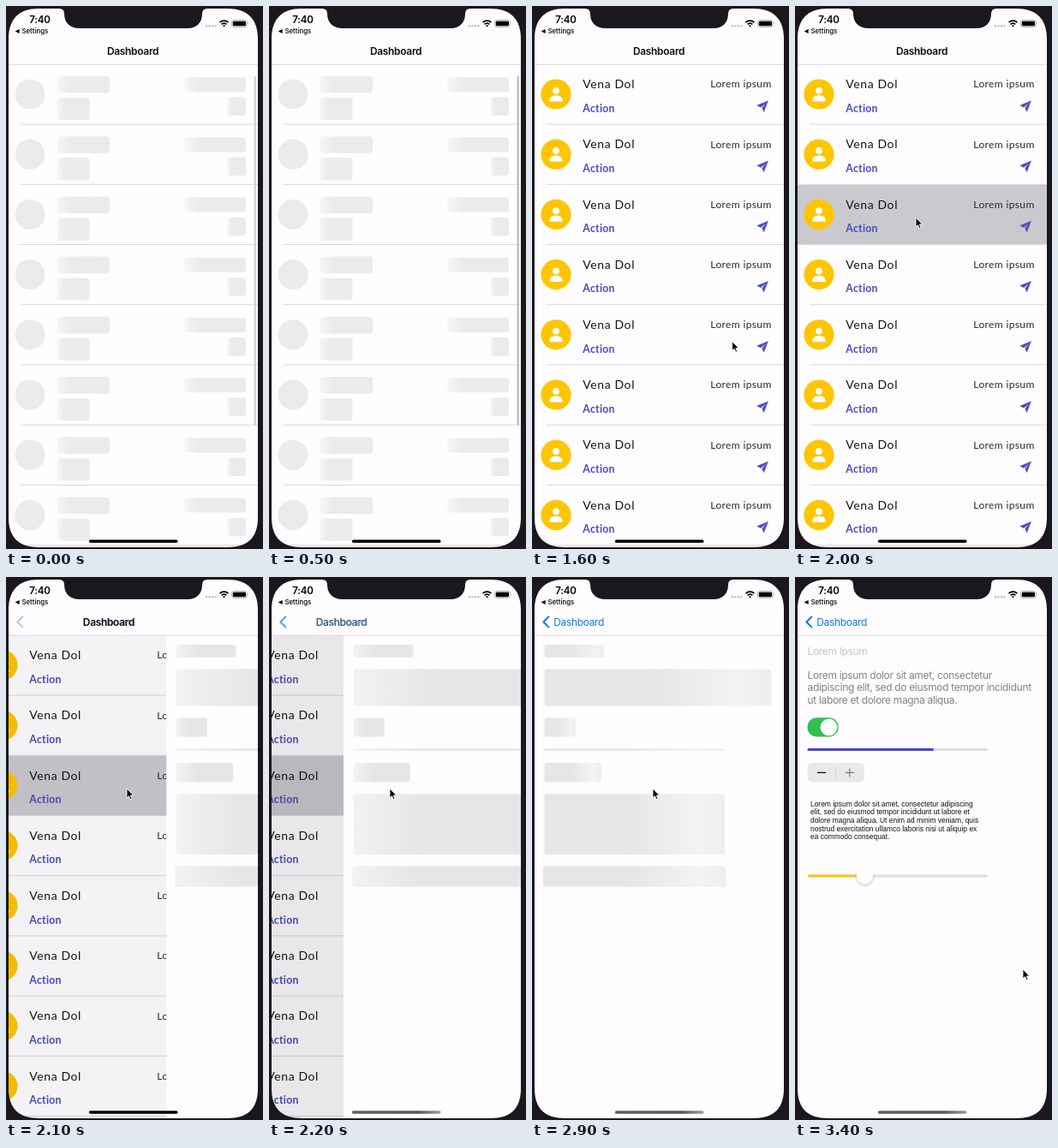
An HTML page that plays this animation: 300x634 px, repeating every 3.5 s.

```html
<!DOCTYPE html>
<html lang="en">
<head>
<meta charset="utf-8">
<title>Dashboard</title>
<style>
  html, body { margin: 0; width: 100%; height: 100%; overflow: hidden; background: #1a181c; }
  svg { display: block; width: 100%; height: 100%; }
  text { white-space: pre; }
  .ui { font: 400 11.93px Inter, Roboto, sans-serif; letter-spacing: -.025em; }
  .semi { font-weight: 600; }
  .blue { fill: #0a7af0; }
  .name { font: 400 14px Lato, sans-serif; letter-spacing: .6px; fill: #141316; }
  .action { font: 700 12.3px Lato, sans-serif; letter-spacing: .25px; fill: #4b4bbf; }
  .note { font: 400 12px Lato, sans-serif; letter-spacing: .37px; fill: #2a292d; }
  .small { font: 400 8.43px "Liberation Sans", Arial, sans-serif; fill: #111; }
  .line { fill: #d9d8db; }
</style>
</head>
<body>
<svg viewBox="0 0 300 634" xmlns="http://www.w3.org/2000/svg">
  <defs>
    <linearGradient id="rowSheen" x1="0" x2=".24">
      <stop stop-color="#f6f5f7"/><stop offset="1" stop-color="#ebeaec"/>
    </linearGradient>
    <linearGradient id="sheen">
      <stop stop-color="#e6e5e8"/><stop offset=".5" stop-color="#f3f2f4"/><stop offset="1" stop-color="#e6e5e8"/>
    </linearGradient>
    <linearGradient id="homeGray">
      <stop stop-color="#605f63"/><stop offset=".75" stop-color="#58575b"/><stop offset="1" stop-color="#a09fa3"/>
    </linearGradient>
    <filter id="soft" x="-50%" y="-50%" width="200%" height="200%">
      <feDropShadow dx="0" dy="1.6" stdDeviation="1.8" flood-opacity=".25"/>
    </filter>
  </defs>

  <rect width="300" height="634" fill="#fffdff"/>

  <g id="list">
    <rect id="picked" x="0" y="208.4" width="400" height="70.2" fill="#cac9ce"/>
    <g id="rowBones"></g>
    <g id="rowData"></g>
    <g id="rowLines" class="line"></g>
    <rect id="bar" x="289.5" y="82" width="2.4" height="407.5" rx="1.2" fill="#bfbec1"/>
  </g>
  <rect id="dim" y="68" width="300" height="566"/>

  <g id="detail">
    <rect x="3" y="68" width="300" height="566" fill="#fffdff"/>
    <g id="bones" fill="url(#sheen)"></g>
    <g id="form">
      <text class="ui" x="14.5" y="90.5" fill="#c4c3c6">Lorem Ipsum</text>
      <g id="para" class="ui" fill="#828185"></g>
      <rect x="14.5" y="164.3" width="36.2" height="22.2" rx="11.1" fill="#30bf50"/>
      <circle cx="39.5" cy="175.4" r="9.9" fill="#fff"/>
      <rect x="14.5" y="200" width="210.5" height="3" rx="1.5" fill="#dfdee1"/>
      <rect x="14.5" y="200" width="147.5" height="3" rx="1.5" fill="#4b4bbf"/>
      <rect x="14.5" y="217" width="66.3" height="22.5" rx="5.5" fill="#e9e8eb"/>
      <rect x="47.1" y="221.8" width=".9" height="13" fill="#cbcacd"/>
      <path d="M26 228.4h10" stroke="#111" stroke-width="1.3"/>
      <path d="M58.8 228.4h10M63.8 223.4v10" stroke="#7a797d" stroke-width="1.2"/>
      <g id="story" class="small"></g>
      <rect x="15" y="347.5" width="210" height="3" rx="1.5" fill="#dfdee1"/>
      <rect x="15" y="347.5" width="66" height="3" rx="1.5" fill="#fec31c"/>
      <circle cx="81.5" cy="348.6" r="9.8" fill="#fff" filter="url(#soft)"/>
    </g>
  </g>

  <g id="nav">
    <rect width="300" height="68" fill="#fffdff"/>
    <rect y="67.8" width="300" height="1" fill="#d9d8db"/>
    <path id="chevron" d="M19.4 46.4L13.4 52.5L19.4 58.6" fill="none" stroke="#0a7af0" stroke-width="2" stroke-linecap="round" stroke-linejoin="round"/>
    <g id="title">
      <text id="titleBlue" class="ui blue" x="0" y="56.6">Dashboard</text>
      <text id="titleBlack" class="ui semi" x="0" y="56.6" fill="#0c0b0e">Dashboard</text>
    </g>
    <text class="ui semi" x="27.3" y="20.2" style="font-size:11.6px">7:40</text>
    <path d="M10.6 29.5l5-2.6v5.2z"/>
    <text class="ui" x="18.4" y="32.3" style="font-size:7.9px;font-weight:500;letter-spacing:0">Settings</text>
    <g fill="#c3c2c5">
      <circle cx="233.9" cy="23.3" r="1.3"/><circle cx="237.4" cy="23.3" r="1.3"/>
      <circle cx="240.9" cy="23.3" r="1.3"/><circle cx="244.4" cy="23.3" r="1.3"/>
    </g>
    <g fill="none" stroke="#000" stroke-width="1.7">
      <path d="M249.6 19.1a7 7 0 0 1 9.8 0M251.6 21.4a4.3 4.3 0 0 1 5.8 0"/>
      <path d="M254.5 24.6l-1.5-1.7a2.2 2.2 0 0 1 3 0z" fill="#000" stroke="none"/>
    </g>
    <rect x="263.6" y="16.6" width="17.6" height="7.8" rx="2.3" fill="none" stroke="#98979a" stroke-width=".8"/>
    <rect x="264.8" y="17.8" width="15.2" height="5.4" rx="1.3"/>
    <path d="M282.1 19.2q1.2 1.3 0 2.6z" fill="#98979a"/>
  </g>

  <rect id="home" x="96.8" y="623.2" width="103.8" height="3.6" rx="1.8"/>
  <path fill="#1a181c" fill-rule="evenodd" d="M0 0H300V634H0Z
    M38 3H62Q68 3 68 9C68 19 74 26 86 26H212C223 26 229 19 229 9Q229 3 235 3H258
    C282 3 294 15 294 39V597C294 621 282 632 258 632H39C15 632 3 621 3 597V39C3 15 15 3 38 3Z"/>

  <path id="cursor" d="M0 0V11L2.5 8.7L4.2 12.6L6 11.8L4.3 8H7.7Z" stroke="#fff" stroke-width=".9" stroke-linejoin="round"/>
</svg>

<script>
const LOOP = 3500, STEP = 100, ROW = 70.2, WIDTH = 291;
const $ = id => document.getElementById(id);
const clamp = v => Math.min(1, Math.max(0, v));
const smooth = v => { const k = clamp(v); return k * k * (3 - 2 * k); };
const mix = (a, b, k) => a + (b - a) * k;
const show = (id, on) => $(id).setAttribute('visibility', on ? 'visible' : 'hidden');
const fade = (id, v) => $(id).setAttribute('opacity', clamp(v));
const move = (id, x, y = 0) => $(id).setAttribute('transform', `translate(${x} ${y})`);

const box = (x, y, w, h, r) => `<rect x="${x}" y="${y}" width="${w}" height="${h}" rx="${r}"/>`;
const rows = make => Array.from({ length: 8 }, (_, i) =>
  `<g transform="translate(0 ${i * ROW})">${make}</g>`).join('');
const lines = (list, x, y, gap) => list.map((s, i) =>
  `<text x="${x}" y="${y + i * gap}">${s}</text>`).join('');

$('rowBones').innerHTML = rows(
  '<circle cx="28" cy="103" r="17.6" fill="#ebeaec"/><g fill="url(#rowSheen)">' +
  box(59.3, 82, 61.7, 19.6, 3.5) + box(59.3, 107, 38.2, 26, 3.5) +
  box(208.3, 83.2, 71.7, 17, 3.5) + box(258.5, 106.3, 21.5, 21.6, 3.5) + '</g>');

$('rowData').innerHTML = rows(`
  <circle cx="28" cy="103" r="17.6" fill="#fec500"/>
  <g fill="#fff"><circle cx="28" cy="98.8" r="3.9"/>
  <path d="M20.2 110.3C20.2 106.2 24 104.2 28 104.2S35.8 106.2 35.8 110.3Q35.8 111.4 34.7 111.4H21.3Q20.2 111.4 20.2 110.3Z"/></g>
  <text class="name" x="59.3" y="96.2">Vena Dol</text>
  <text class="action" x="59.3" y="123.8">Action</text>
  <text class="note" x="208.3" y="95.4">Lorem ipsum</text>
  <path d="M275.5 110.8L262.8 116L267 118.2L273.4 113L268.7 119.2L270.6 123.4Z" fill="#4b4bbf" stroke="#4b4bbf" stroke-width=".5" stroke-linejoin="round"/>`);

$('rowLines').innerHTML = rows('<rect x="17" y="137.6" width="283" height="1"/>');

$('bones').innerHTML = box(14.5, 79, 69.7, 15, 3) + box(14.5, 107.4, 264.7, 43.2, 3) +
  box(14.5, 164.4, 36.2, 22, 3) + box(14.5, 200.2, 210.7, 2.8, 1) +
  box(14.5, 217, 66.3, 22.6, 3) + box(14.5, 253.3, 210.7, 70.6, 3) +
  box(13, 337.6, 213.5, 24.2, 3);

$('para').innerHTML = lines([
  'Lorem ipsum dolor sit amet, consectetur',
  'adipiscing elit, sed do eiusmod tempor incididunt',
  'ut labore et dolore magna aliqua.'], 14.5, 119.2, 14.25);

$('story').innerHTML = lines([
  'Lorem ipsum dolor sit amet, consectetur adipiscing',
  'elit, sed do eiusmod tempor incididunt ut labore et',
  'dolore magna aliqua. Ut enim ad minim veniam, quis',
  'nostrud exercitation ullamco laboris nisi ut aliquip ex',
  'ea commodo consequat.'], 18, 267.6, 9.7);

// Share of the push still to go: a critically damped spring.
function pushLeft(t) {
  if (t <= 2000) return 1;
  if (t > 2700) return 0;
  const x = (t - 1994) * .0121;
  return (1 + x) * Math.exp(-x);
}

function draw(t) {
  const left = pushLeft(t), done = 1 - left, pushed = left < 1;

  show('rowBones', t < 1000);
  show('rowData', t >= 1000);
  show('picked', t >= 2000);
  fade('bar', t < 1000 ? .65 + .35 * clamp(t / 200) : 1 - (t - 1000) / 500);
  move('list', -.3 * WIDTH * done);
  fade('dim', .12 * done);

  show('detail', pushed);
  move('detail', WIDTH * left);
  show('bones', pushed && t < 3200);
  show('form', t >= 3200);
  const sweep = mix(-.02, .85, clamp((t - 2200) / 500) ** 1.5);
  $('sheen').setAttribute('x1', sweep - .38);
  $('sheen').setAttribute('x2', sweep + .38);

  move('title', mix(25.3, 118, Math.min(1, left * 1.1)));
  fade('titleBlack', left * 1.6);
  fade('titleBlue', pushed ? 1.1 - left * 1.2 : 0);
  fade('chevron', done);
  $('home').setAttribute('fill', left < .5 ? 'url(#homeGray)' : '#000');

  show('cursor', t >= 1500);
  const away = smooth((t - 3200) / 200), near = smooth((t - 1400) / 500);
  move('cursor', mix(mix(284, 141, near), 266, away), mix(mix(470, 247, near), 458, away));
}

const start = performance.now();
function tick() {
  const t = (performance.now() - start) % LOOP;
  draw(Math.floor(t / STEP) * STEP);
  requestAnimationFrame(tick);
}
draw(0);
requestAnimationFrame(tick);
</script>
</body>
</html>
```
